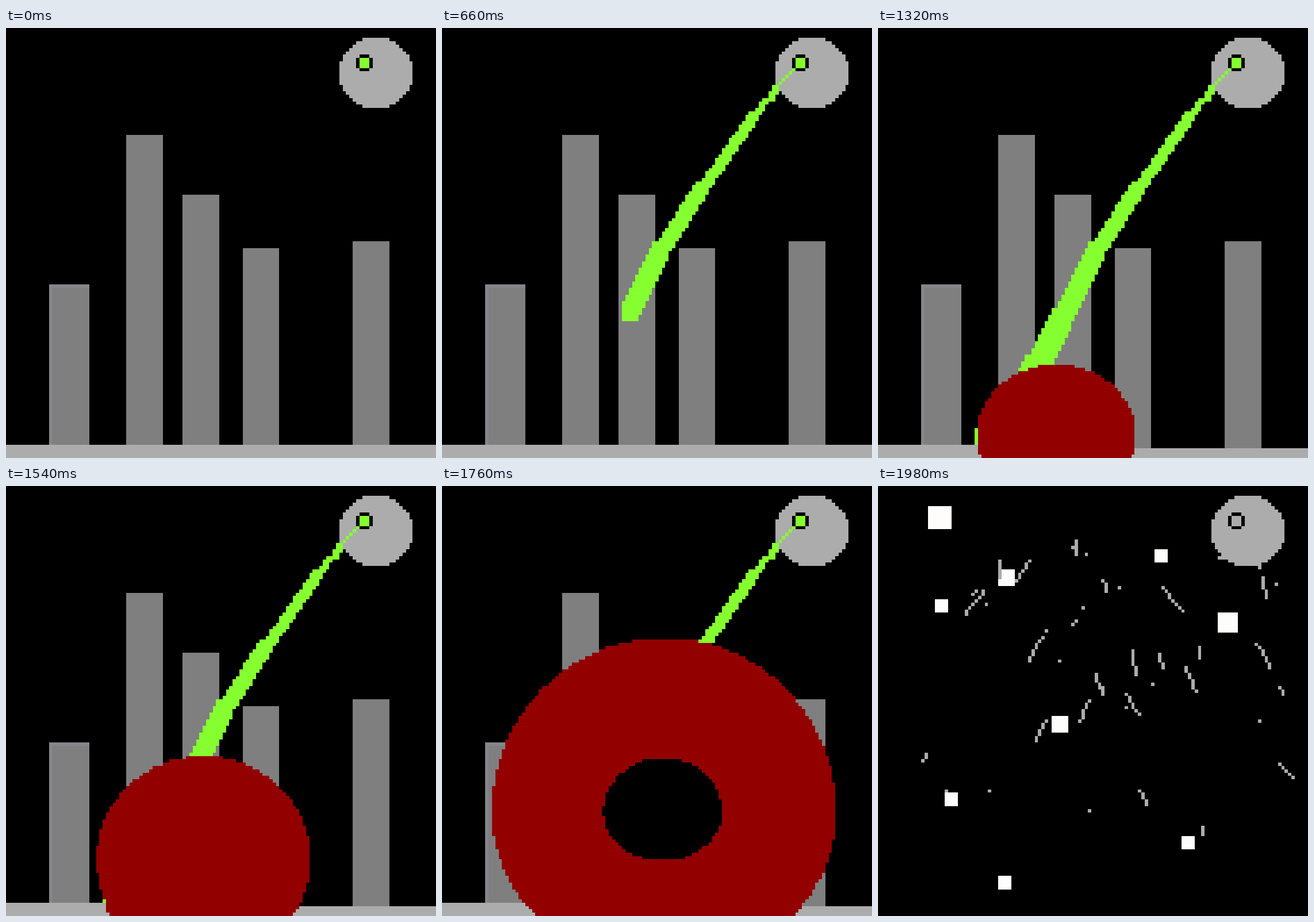
Recreate the animation shown at these times as an HTML page with a canvas. Size 748x748 px, loop 3190 ms.

```html
<!DOCTYPE html>
<html lang="en">
<head>
<meta charset="utf-8">
<title>Beam and blast</title>
<style>
html, body { margin: 0; height: 100%; overflow: hidden; background: #000; }
canvas { display: block; width: 100vw; height: 100vh; image-rendering: pixelated; }
</style>
</head>
<body>
<canvas width="129" height="129"></canvas>
<script>
const SIZE = 129, LOOP = 3190, TICK = 110;
const BLAST = 1320, GROW = 1540, DEBRIS = 1980;
const GREY = '#acacac', WALL = '#7f7f7f', EDGE = '#85858c', GREEN = '#85ff30', RED = '#930000', WHITE = '#fffcfc';
const ctx = document.querySelector('canvas').getContext('2d');

// x, top
const towers = [[14, 78], [36, 32], [53, 50], [71, 66], [104, 64]];

// Start of each stroke and its brush size
const beam = [
  [105, 12, 1], [99, 17, 2], [96, 21, 2], [92, 25, 3], [76, 46, 4], [63, 64, 5],
  [52, 84, 6], [44, 98, 7], [36, 111, 9], [31, 117, 10], [27, 121]
];

// Key ovals: cx, cy, rx, upper radius, lower radius
const fireball = [[53.5, 122, 23.9, 21, 21], [65, 102, 40.2, 41, 41], [68.3, 94, 63.2, 64, 52]];
const hollow = [[64, 101, 0, 0, 0], [64, 101, 4.2, 4, 4], [68.5, 94.5, 31.5, 28.5, 25.5]];

// x, y, size
const flares = [[15, 6, 7], [83, 19, 4], [36, 25, 5], [17, 34, 4], [102, 38, 6], [52, 69, 5], [20, 92, 4], [91, 105, 4], [36, 117, 4]];

const random = n => {
  const v = Math.sin(n * 12.9898) * 43758.5453;
  return v - Math.floor(v);
};

function rect(color, x, y, w, h) {
  ctx.fillStyle = color;
  ctx.fillRect(x, y, w, h);
}

// Drags a square brush along a line
function drag(color, x0, y0, x1, y1, size) {
  const steps = Math.max(1, Math.round(Math.max(Math.abs(x1 - x0), Math.abs(y1 - y0))));
  for (let i = 0; i <= steps; i++) {
    const k = i / steps;
    rect(color, Math.round(x0 + (x1 - x0) * k), Math.round(y0 + (y1 - y0) * k), size, size);
  }
}

function oval(color, [cx, cy, rx, up, down]) {
  for (let y = Math.round(cy - up); y < cy + down; y++) {
    const dy = y + 0.5 - cy;
    const half = rx * Math.sqrt(Math.max(0, 1 - (dy / (dy < 0 ? up : down)) ** 2));
    const left = Math.round(cx - half);
    rect(color, left, y, Math.round(cx + half) - left, 1);
  }
}

// Oval between two keys; every second stage is a key
function ovalAt(keys, stage) {
  const i = Math.min(Math.floor(stage / 2), keys.length - 2), k = stage / 2 - i;
  return keys[i].map((v, j) => v + (keys[i + 1][j] - v) * k);
}

function drawDish(core) {
  rect('#000', 106, 8, 3, 5);
  rect('#000', 105, 9, 5, 3);
  rect(core, 106, 9, 3, 3);
}

function drawBeam(strokes) {
  for (let i = 0; i < strokes; i++) {
    const [x, y, size] = beam[i], [nextX, nextY] = beam[i + 1];
    drag(GREEN, x, y, nextX + 2, nextY - 1, size);
  }
}

function drawCity(t) {
  rect(EDGE, 13, 77, 12, 48);
  for (const [x, top] of towers) rect(WALL, x, top, 11, 126 - top);
  drawBeam(Math.min(Math.floor(t / TICK), beam.length - 1));
  const rightFloor = t >= BLAST && t < DEBRIS - TICK ? 126 : 125;
  rect(GREY, 0, 125, 53, 4);
  rect(GREY, 53, rightFloor, 76, SIZE - rightFloor);
}

function drawBlast(t) {
  const stage = Math.max(0, Math.floor((t - GROW) / TICK) + 1);
  oval(RED, fireball[0]);
  oval(RED, ovalAt(fireball, stage));
  if (stage > 1) oval('#000', ovalAt(hollow, stage));
}

function drawDebris() {
  for (const [x, y, size] of flares) rect(WHITE, x, y, size, size);
  // Specks first, then shards that lean away from the middle
  for (let i = 1; i <= 42; i++) {
    const x = 14 + 108 * random(i), y = 13 + 96 * random(i + 50);
    const length = i <= 17 ? 0 : 1 + 7 * random(i + 100);
    const lean = Math.sign(x - 64) * 0.8 * random(i + 150);
    drag(GREY, x, y, x + lean * length, y + length, 1);
  }
}

function draw(t) {
  const exploded = t >= DEBRIS;
  rect('#000', 0, 0, SIZE, SIZE);
  oval(GREY, [111, 13.5, 11.2, 10.6, 10.6]);
  if (exploded) drawDebris();
  else drawCity(t);
  drawDish(exploded ? GREY : GREEN);
  if (t >= BLAST && !exploded) drawBlast(t);
}

const start = performance.now();
function tick() {
  draw((performance.now() - start) % LOOP);
  requestAnimationFrame(tick);
}
tick();
</script>
</body>
</html>
```
